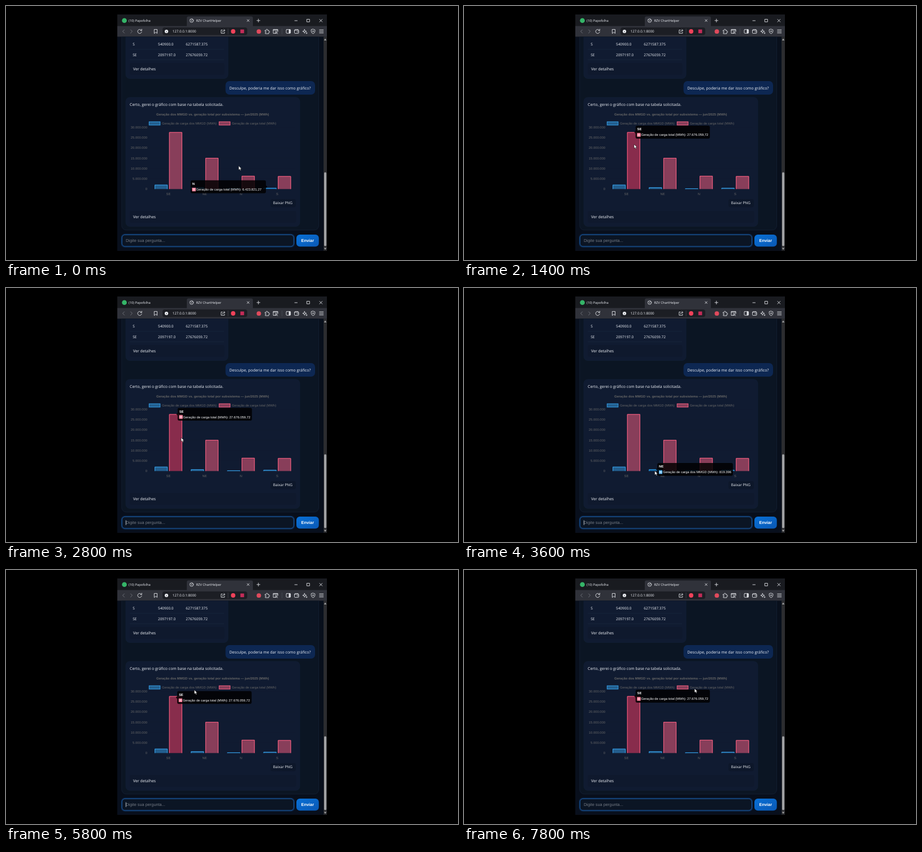
Animation of 800 by 450 pixels, one loop 8 s. Source, as an HTML page:

```html
<!DOCTYPE html>
<html lang="pt-BR">
<head>
<meta charset="utf-8">
<title>Chat com gráfico</title>
<style>
  html, body { margin: 0; width: 100%; height: 100%; overflow: hidden; background: #000; }
  svg { display: block; width: 100vw; height: 100vh; }
  text { white-space: pre; }
  .ui { font-family: "Open Sans", "Noto Sans", sans-serif; fill: #f0f3f8; }
  .chart { font-family: "Liberation Sans", Arial, sans-serif; font-size: 5.84px; fill: #666; }
  .form { font-family: "Liberation Sans", Arial, sans-serif; font-size: 7.35px; }
  .line { fill: none; stroke: #dfe1e6; stroke-width: .9; stroke-linecap: round; stroke-linejoin: round; }
  .dim { stroke: #73767e; }
  .b { font-weight: 700; }
  .mid { text-anchor: middle; }
  .end { text-anchor: end; }
</style>
</head>
<body>
<svg viewBox="0 0 800 450" text-rendering="geometricPrecision">
  <defs>
    <linearGradient id="send" x1="0" y1="0" x2="1" y2="1">
      <stop offset="0" stop-color="#0870d6"/><stop offset="1" stop-color="#0a58b4"/>
    </linearGradient>
    <clipPath id="page"><rect x="197" y="54.500" width="365" height="379"/></clipPath>
  </defs>
  <rect width="800" height="450"/>

  <!-- browser window -->
  <rect x="197" y="15" width="371" height="418.500" fill="#191b20"/>
  <path d="M320 36V21.500q0-3 3-3H434q3 0 3 3V36z" fill="#30323a"/>
  <rect x="197" y="35.500" width="371" height="19" fill="#30323a"/>
  <circle cx="209.500" cy="25.800" r="4.300" fill="#35b568"/>
  <g class="ui" font-size="5.750">
    <text x="217" y="27.900">(10) Papofolha</text>
    <text x="336.500" y="27.900">RZV ChartHelper</text>
  </g>
  <g class="line">
    <g stroke-width=".7"><circle cx="328.500" cy="25.800" r="3.300"/><path d="M326 24l2.500 1.500-1 2.500M329 22.700l.5 1.800 2 .5M329.500 28.500l1.500-1.500"/></g>
    <path d="M426.800 24l3.500 3.500m0-3.500l-3.500 3.500M444 25.800h5.500m-2.750-2.750v5.500"/>
    <path d="M511 26h4.500M532.700 23.500h4.600v4.600h-4.600zM555 23.500l4.700 4.700m0-4.700l-4.700 4.700"/>
    <path class="dim" d="M209.500 42l-3 3 3 3M220.500 42l3 3-3 3"/>
    <path d="M239.500 42.800a3.600 3.600 0 1 0 .7 3M240.300 41v2.500h-2.500"/>
    <path d="M262.700 41.500h4.800v7l-2.400-2-2.400 2z"/>
  </g>
  <rect x="277" y="38" width="150" height="13.500" rx="4" fill="#1c1e24"/>
  <circle cx="284" cy="45" r="3.100" fill="#eceef2"/>
  <path d="M284 43.200v.1m0 1.300v2" stroke="#1c1e24" stroke-width=".9"/>
  <text class="ui" x="294.700" y="47.200" font-size="6.200">127.0.0.1:8000</text>
  <path d="M393 40v10M488.500 40v10" stroke="#4b4e57" stroke-width=".7"/>
  <circle cx="402" cy="45" r="3.900" fill="#f0425a"/>
  <rect x="414.800" y="41.600" width="6.600" height="6.600" fill="#c32c58"/>
  <circle cx="447.500" cy="45.200" r="3.900" fill="#e04a5c"/>
  <g class="line">
    <path d="M383 42.500h-2.200v5.800h6v-2M383.200 46c.3-2 1.500-2.800 4-2.800m-1.600-1.700l1.800 1.700-1.800 1.700"/>
    <path d="M459 43h1.800c-.7-2.500 2.700-2.500 2 0h2.200v1.900c2.300-.7 2.300 2.500 0 1.900v2.200h-6v-2.200c2 .4 2-2.300 0-1.900z"/>
    <path d="M478 48.500h-5v-7h8v4M473 43h8"/><circle cx="478" cy="46.500" r="1.500"/><path d="M479.200 47.700l1.600 1.400"/>
    <rect x="496" y="41.700" width="7.600" height="6.600" rx="1"/><path d="M501 42v6h2V42z" fill="#dfe1e6"/>
    <path d="M510.500 43.300v4.200q0 1 1 1h5.500q1 0 1-1v-4.200zq0-1.500 1.500-1.500h5v1.500M515 45.800h3"/>
    <path d="M528.400 41.500l.9 2.500 2.500.9-2.500.9-.9 2.500-.9-2.500-2.500-.9 2.500-.9zM532 47v2m-1-1h2"/>
    <path d="M543.500 41l3.300 1.200v2.500q0 3-3.300 4.300-3.300-1.300-3.300-4.300v-2.500z"/><circle cx="543.500" cy="44.700" r=".9"/>
    <path d="M554.700 42.300h7M554.700 45h7M554.700 47.700h7"/>
  </g>

  <!-- page -->
  <rect x="197" y="54.500" width="365" height="379" fill="#080f1c"/>
  <g clip-path="url(#page)">
    <rect x="204.800" y="40" width="348.700" height="357" rx="8" fill="#0b1523" stroke="#172438" stroke-width=".7"/>
    <rect x="212" y="40" width="181" height="88.500" rx="7" fill="#101b31" stroke="#14223a" stroke-width=".6"/>
    <path d="M219 76.800h167M219 95.200h167" stroke="#1b2a42" stroke-width=".6"/>
    <rect x="219" y="101" width="167.500" height="21" rx="4" fill="#0f192d"/>
    <rect x="388.500" y="133" width="158.500" height="24" rx="7" fill="#0d2752"/>
    <rect x="212" y="162" width="308" height="228.500" rx="7" fill="#101b31" stroke="#14223a" stroke-width=".6"/>
    <rect x="468" y="342" width="45" height="14.500" rx="4" fill="#0d172a"/>
    <rect x="219" y="363" width="294.500" height="21" rx="4" fill="#0f192d"/>
  </g>
  <g class="ui" font-size="6.450">
    <text x="224.300" y="70">S</text><text x="269" y="70">540900.0</text><text x="318.300" y="70">6271587.375</text>
    <text x="224.300" y="88.500">SE</text><text x="269" y="88.500">2097197.0</text><text x="318.300" y="88.500">27676059.72</text>
    <text x="472.800" y="351.300">Baixar PNG</text>
  </g>
  <g class="ui" font-size="6.940">
    <text x="225" y="114">Ver detalhes</text>
    <text x="395.300" y="147.700">Desculpe, poderia me dar isso como gráfico?</text>
    <text x="219" y="176.500">Certo, gerei o gráfico com base na tabela solicitada.</text>
    <text x="225" y="376">Ver detalhes</text>
  </g>
  <rect x="204.300" y="404.300" width="306" height="22.600" rx="6" fill="none" stroke="#0d2a50" stroke-width="1.500"/>
  <rect x="205.300" y="405.300" width="304" height="20.600" rx="5.500" fill="#0b1524" stroke="#1d5ea6"/>
  <text class="form" x="212" y="418.300" fill="#757b85">Digite sua pergunta...</text>
  <path id="caret" d="M212.300 411.500v8.500" stroke="#f0f3f8" stroke-width=".7"/>
  <rect x="514" y="405" width="39.700" height="21.300" rx="6" fill="url(#send)"/>
  <text class="form b mid" x="533.800" y="418.200" fill="#fff">Enviar</text>
  <rect x="562" y="54.500" width="6" height="379" fill="#2b2c2f"/>
  <rect x="563" y="294.500" width="4" height="131" rx="2" fill="#a0a1a3"/>
  <path d="M562.800 61l2.200-3.500 2.200 3.500zM562.800 428.500l2.200 3.500 2.200-3.500z" fill="#a0a1a3"/>

  <g id="chart" class="chart">
    <text class="b mid" x="365.700" y="193.600">Geração dos MMGD vs. geração total por subsistema — jun/2025 (MWh)</text>
  </g>
  <g id="tip" class="chart">
    <path id="tipBox" fill="#000" fill-opacity=".84"/>
    <text id="tipTitle" class="b" fill="#fff"/>
    <rect id="tipKeyBg" width="5.840" height="5.840" fill="#fff"/>
    <rect id="tipKey" width="5.240" height="5.240" stroke-width=".9"/>
    <text id="tipBody" fill="#fff"/>
  </g>
  <path id="cursor" d="M0 0v7.200l1.700-1.500 1.200 2.600 1.300-.6-1.200-2.500h2.200z" fill="#fff" stroke="#000" stroke-width=".5"/>
</svg>
<script>
const LOOP = 8000, STEP = 200, TIP_MS = 400;
const BASE = 324.3, PER_MILLION = 3.643, LEFT = 255.3, CAT = 64.2, BAR = 23.1;
const names = ['SE', 'NE', 'N', 'S'];
const series = [
  { label: 'Geração de carga dos MMGD (MWh)', rgb: [54, 162, 235], hot: [10, 153, 250], legend: 253.3,
    data: [2097197, 819396, 310400, 540900] },
  { label: 'Geração de carga total (MWh)', rgb: [255, 99, 132], hot: [255, 63, 104], legend: 377.2,
    data: [27676059.72, 15133620.63, 6423821.27, 6271587.38] }
];
// start time, series, category
const hovers = [[-500, 0, 3], [-10, 1, 2], [480, 1, 1], [880, 1, 0], [1980, 1, 1], [2480, 1, 0],
  [3180, 0, 1], [4280, 0, 0], [5560, 1, 0]];
// time, x, y
const path = [[0, 411.8, 283.3], [600, 368, 272], [1200, 302, 249], [1400, 301, 245], [1800, 322, 262],
  [2200, 365.5, 284], [2600, 308, 262], [3000, 312, 268], [3600, 337.6, 324], [4200, 308, 322],
  [4800, 275, 316], [5400, 298, 252], [5800, 333.3, 212.5], [6400, 358, 204], [7000, 402, 208],
  [7200, 402, 208], [7800, 408, 210], [8000, 408, 210]];

const $ = id => document.getElementById(id);
const lerp = (a, b, k) => a + (b - a) * k;
const rgb = (c, a = 1) => `rgba(${c.map(Math.round)},${a})`;
const format = n => {
  const [int, dec] = String(n).split('.');
  return int.replace(/\B(?=(\d{3})+$)/g, '.') + (dec ? ',' + dec : '');
};
function set(node, attrs) {
  for (const k in attrs) node.setAttribute(k, attrs[k]);
  return node;
}
function add(tag, attrs, text) {
  const node = set(document.createElementNS('http://www.w3.org/2000/svg', tag), attrs);
  if (text) node.textContent = text;
  return $('chart').appendChild(node);
}

for (let m = 0; m <= 30; m += 5) {
  const y = BASE - m * PER_MILLION;
  add('path', { d: `M${LEFT - 3} ${y}H512`, stroke: '#000', 'stroke-opacity': .1, 'stroke-width': .5 });
  add('text', { x: 250, y: y + 2, class: 'end' }, format(m * 1e6));
}
names.forEach((n, i) => add('text', { x: LEFT + CAT * (i + .5), y: 335, class: 'mid' }, n));

const bars = series.map((s, si) => {
  add('rect', { x: s.legend, y: 205.1, width: 19.5, height: 5.84, fill: rgb(s.rgb, .5), stroke: rgb(s.rgb) });
  add('text', { x: s.legend + 22.6, y: 210.1 }, s.label);
  return s.data.map((v, i) => {
    const x = LEFT + CAT * (i + .5) + (si ? 12.85 : -12.85);
    const y = BASE - v / 1e6 * PER_MILLION;
    const l = x - BAR / 2, r = x + BAR / 2;
    add('rect', { x: l, y, width: BAR, height: BASE - y });
    const fill = $('chart').lastChild;
    add('path', { d: `M${l + .5} ${BASE}V${y + .5}H${r - .5}V${BASE}`, fill: 'none', stroke: rgb(s.rgb) });
    const body = `${s.label}: ${format(v)}`;
    $('tipBody').textContent = body;
    const w = $('tipBody').getComputedTextLength() + 12.65;
    const flip = x + 3.4 + w > 512;
    return { s, x, y, fill, body, name: names[i], w, flip, left: flip ? x - 3.4 - w : x + 3.4 };
  });
});

function drawTip(from, to, k) {
  const x = lerp(from.left, to.left, k), y = lerp(from.y, to.y, k), w = lerp(from.w, to.w, k);
  const r = 2.9, h = 11.4, top = y - h, right = x + w;
  const caret = to.flip ? `M${right} ${y - 2.4}l2.400 2.400-2.400 2.400z` : `M${x} ${y - 2.4}l-2.400 2.400 2.400 2.400z`;
  set($('tipBox'), { d: `M${x + r} ${top}H${right - r}q${r} 0 ${r} ${r}V${y + h - r}q0 ${r} ${-r} ${r}` +
    `H${x + r}q${-r} 0 ${-r} ${-r}V${top + r}q0 ${-r} ${r} ${-r}z` + caret });
  set($('tipTitle'), { x: x + 2.9, y: y - 3 }).textContent = to.name;
  set($('tipBody'), { x: x + 9.75, y: y + 7 }).textContent = to.body;
  set($('tipKeyBg'), { x: x + 2.9, y: y + 2 });
  set($('tipKey'), { x: x + 3.2, y: y + 2.3, fill: rgb(to.s.rgb, .5), stroke: rgb(to.s.rgb) });
}

function render(t) {
  let h = 1;
  while (h + 1 < hovers.length && hovers[h + 1][0] <= t) h++;
  const [start, si, ci] = hovers[h], [, ps, pc] = hovers[h - 1];
  const to = bars[si][ci], from = bars[ps][pc];
  const k = 1 - (1 - Math.min(1, (t - start) / TIP_MS)) ** 4;
  for (const b of bars.flat()) {
    const heat = b === to ? k : b === from ? 1 - k : 0;
    set(b.fill, { fill: rgb(b.s.rgb.map((c, i) => lerp(c, b.s.hot[i], heat)), .5) });
  }
  drawTip(from, to, k);

  let p = 0;
  while (p + 2 < path.length && path[p + 1][0] <= t) p++;
  const [t0, x0, y0] = path[p], [t1, x1, y1] = path[p + 1];
  const u = (t - t0) / (t1 - t0), e = u * u * (3 - 2 * u);
  set($('cursor'), { transform: `translate(${lerp(x0, x1, e)} ${lerp(y0, y1, e)})` });

  const blink = t % 1060;
  set($('caret'), { visibility: blink >= 400 && blink < 930 ? 'visible' : 'hidden' });
}

const begin = performance.now();
function tick() {
  const t = (performance.now() - begin) % LOOP;
  render(Math.floor(t / STEP) * STEP);
  requestAnimationFrame(tick);
}
tick();
</script>
</body>
</html>
```
